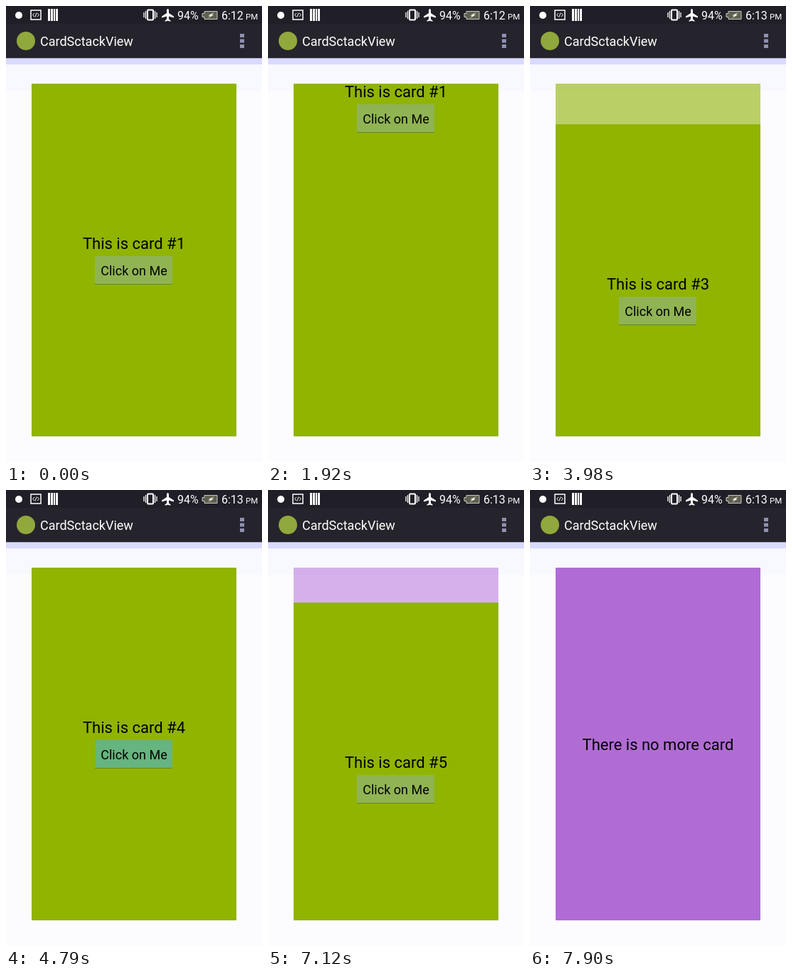
Animation, 360 px wide and 640 px high, one loop 9.15 s. Source, as an HTML page:

```html
<!DOCTYPE html>
<html lang="en">
<head>
<meta charset="utf-8">
<title>Card stack</title>
<style>
  html, body { margin: 0; width: 100%; height: 100%; overflow: hidden; background: #fcfcff; }
  svg { display: block; width: 360px; height: 640px; font-family: Roboto, sans-serif; }
  .label { font-size: 22px; text-anchor: middle; }
  .button { font-size: 18px; text-anchor: middle; }
</style>
</head>
<body>
<svg viewBox="0 0 360 640">
  <defs>
    <clipPath id="frame"><rect x="36" y="109" width="288" height="495"/></clipPath>
  </defs>

  <rect width="360" height="640" fill="#fcfcff"/>
  <rect y="74" width="360" height="45" fill="#f8f8ff"/>
  <rect y="74" width="360" height="8" fill="#dadaff"/>
  <rect width="360" height="73" fill="#25242c"/>
  <rect width="360" height="25" fill="#201f28"/>
  <rect y="73" width="360" height="1" fill="#b4b4d8"/>

  <!-- status bar -->
  <g fill="#fff">
    <circle cx="18" cy="13" r="5"/>
    <rect x="35" y="6" width="14" height="13" fill="none" stroke="#fff" stroke-width="1.5"/>
    <path d="M40 10l-2.5 2.5 2.5 2.5M44 10l2.5 2.5-2.5 2.5M43 9.500l-2 6" fill="none" stroke="#fff"/>
    <path d="M59 4h3v17h-3zM63 4h3v17h-3zM67 4h2v17h-2zM70 4h3v17h-3z"/>
    <rect x="199" y="5.500" width="8" height="14" rx="1" fill="none" stroke="#fff" stroke-width="2"/>
    <path d="M196.500 7v11M194 9v7M209.500 7v11M212 9v7" stroke="#fff" stroke-width="1.300"/>
    <path d="M227.500 4q-1.500 0-1.500 3v3l-7 4.500v2l7-2v4l-2.500 2v1.300l4-1 4 1v-1.300l-2.500-2v-4l7 2v-2l-7-4.500v-3q0-3-1.500-3z"/>
    <path d="M279 7.500h18v11h-18v-3h-3v-5h3z" fill="#606050" stroke="#c8c8c0"/>
    <path d="M293 9l-9 4.500h3.500l-3.500 3.500 8-4.500h-3z"/>
    <text x="241" y="19" font-size="16">94%</text>
    <text id="clock" x="303" y="19" font-size="16">6:12</text>
    <text x="337" y="19" font-size="11.500">PM</text>
  </g>

  <!-- action bar -->
  <circle cx="28" cy="49" r="13" fill="#90a83c"/>
  <text x="48" y="56" font-size="18" fill="#fff">CardSctackView</text>
  <path d="M329 39h6v5h-6zM329 46.500h6v5h-6zM329 54h6v5h-6z" fill="#9090b0"/>

  <g id="stack" clip-path="url(#frame)"></g>
</svg>
<script>
const LOOP = 9150, HEIGHT = 495, FADE_DISTANCE = 95;
const PRESS = 4790, CLICK = 4900, RELEASE = 5000;

// Each swipe passes through `offset` at time `at`.
const swipes = [
  { start: 1480, end: 2500, at: 1920, offset: -212 },
  { start: 2660, end: 3270, at: 2900, offset: 77 },
  { start: 3570, end: 4460, at: 3980, offset: 56 },
  { start: 5730, end: 6650, at: 5940, offset: -39 },
  { start: 6980, end: 7900, at: 7120, offset: 48 }
];

const smooth = p => p * p * (3 - 2 * p);

function cardOffset(swipe, t) {
  const progress = time =>
    smooth(Math.min(1, Math.max(0, (time - swipe.start) / (swipe.end - swipe.start))));
  const power = Math.log(Math.abs(swipe.offset) / HEIGHT) / Math.log(progress(swipe.at));
  return Math.sign(swipe.offset) * Math.round(HEIGHT * progress(t) ** power);
}

function add(parent, tag, attributes, text = '') {
  const node = document.createElementNS('http://www.w3.org/2000/svg', tag);
  for (const name in attributes) node.setAttribute(name, attributes[name]);
  node.textContent = text;
  return parent.appendChild(node);
}

const stack = document.getElementById('stack');
const clock = document.getElementById('clock');

function makeCard(color, message, baseline) {
  const group = add(stack, 'g', {});
  add(group, 'rect', { x: 36, y: 109, width: 288, height: HEIGHT, fill: color });
  const label = add(group, 'text', { class: 'label', x: 180, y: baseline }, message);
  return { group, label };
}

function makeSwipeCard(number) {
  const card = makeCard('#90b400', `This is card #${number}`, 341);
  card.button = add(card.group, 'rect', { x: 125, y: 351, width: 109, height: 39, rx: 1 });
  add(card.group, 'rect', { x: 125, y: 390, width: 109, height: 1, fill: '#6c8428' });
  add(card.group, 'text', { class: 'button', x: 180, y: 378 }, 'Click on Me');
  return card;
}

// Bottom card first, so that card 1 ends up on top.
const cards = [makeCard('#b06cd4', 'There is no more card', 365)];
for (let number = 5; number >= 1; number--) cards.unshift(makeSwipeCard(number));

function render(t) {
  clock.textContent = t < 2430 ? '6:12' : '6:13';
  const offsets = swipes.map(swipe => cardOffset(swipe, t));
  cards.forEach(({ group, button }, i) => {
    const opacity = i ? Math.min(1, Math.abs(offsets[i - 1]) / FADE_DISTANCE) : 1;
    group.setAttribute('opacity', opacity);
    group.setAttribute('transform', `translate(0 ${offsets[i] || 0})`);
    if (button) {
      const pressed = i === 3 && t >= PRESS && t < RELEASE;
      button.setAttribute('fill', pressed ? '#66b47e' : '#90b454');
    }
  });
  cards[3].label.textContent = t < CLICK ? 'This is card #4' : 'You clicked on button #4';
}

function tick() {
  render(performance.now() % LOOP);
  requestAnimationFrame(tick);
}
tick();
</script>
</body>
</html>
```
